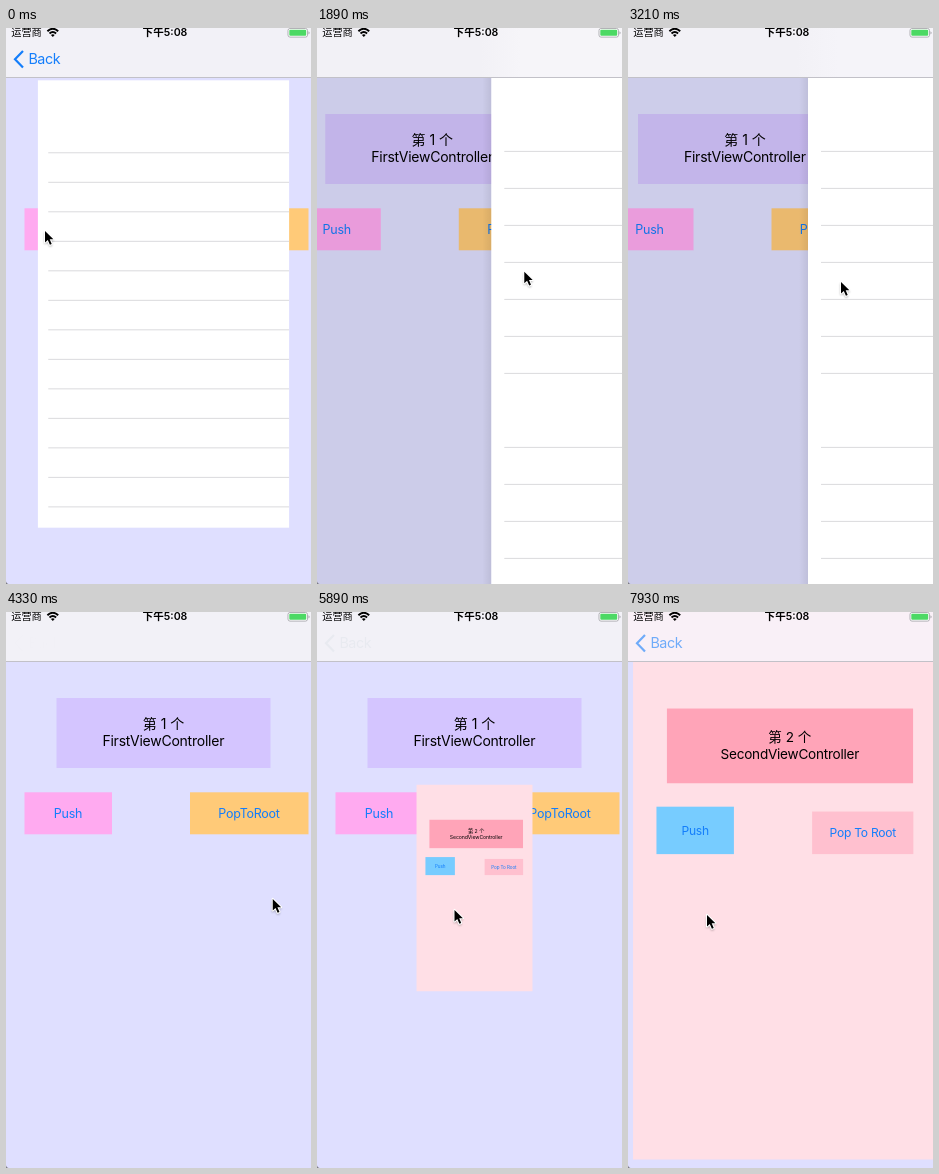
An HTML page for the animation above (7990 ms loop, 305 px wide and 556 px high).

```html
<!DOCTYPE html>
<html lang="zh-Hans">
<head>
<meta charset="utf-8">
<title>Navigation transitions</title>
<style>
html, body { margin: 0; width: 100%; height: 100%; overflow: hidden; background: #dfdfff; }
svg { display: block; width: 100vw; height: 100vh; }
text { font-family: Inter, "Noto Sans CJK SC", "Noto Sans CJK", sans-serif; text-anchor: middle; }
.title { font-size: 14px; letter-spacing: -.24px; }
.cjk { font-size: 14px; }
.button { font-size: 12.5px; letter-spacing: -.26px; fill: #147efb; }
.back { font-size: 14.3px; letter-spacing: -.4px; text-anchor: start; }
.rule { stroke: #dadadd; stroke-width: 1; vector-effect: non-scaling-stroke; }
</style>
</head>
<body>
<svg viewBox="0 0 305 556" preserveAspectRatio="none">
  <defs>
    <linearGradient id="edge"><stop offset="0" stop-opacity="0"/><stop offset="1" stop-opacity=".16"/></linearGradient>
    <linearGradient id="fade"><stop offset=".8" stop-color="#f2f1f6"/><stop offset="1" stop-color="#f2f1f6" stop-opacity="0"/></linearGradient>
    <filter id="soft" x="-50%" y="-50%" width="200%" height="200%"><feGaussianBlur stdDeviation="1"/></filter>
    <path id="arrow" d="M1 1.5V13L3.8 10.4 5.9 15.2 7.7 14.4 5.7 9.7H9.4Z"/>
  </defs>

  <rect width="305" height="556" fill="#dfdfff"/>
  <g id="first">
    <rect x="50.5" y="86" width="214" height="70" fill="#d4c5ff"/>
    <text class="cjk" x="157.5" y="117.2">第 1 个</text>
    <text class="title" x="157.3" y="134">FirstViewController</text>
    <rect x="18.5" y="180.3" width="87.5" height="42" fill="#ffaaf0"/>
    <text class="button" x="62" y="206">Push</text>
    <rect x="184" y="180.3" width="118.5" height="42" fill="#ffca78"/>
    <text class="button" x="243" y="206">PopToRoot</text>
  </g>
  <rect id="dim" width="305" height="556"/>

  <g id="second">
    <rect y="-4.5" width="315" height="561" fill="#ffdfe6"/>
    <rect x="35" y="90.6" width="254.3" height="77.2" fill="#ffa4b8"/>
    <text class="cjk" x="162" y="125.5">第 2 个</text>
    <text class="title" x="162" y="142.5">SecondViewController</text>
    <rect x="24.2" y="192" width="80" height="49" fill="#77ccff"/>
    <text class="button" x="64.2" y="221">Push</text>
    <rect x="185" y="197" width="104.6" height="44" fill="#ffc0cf"/>
    <text class="button" x="237.3" y="223.3">Pop To Root</text>
  </g>

  <g id="table">
    <rect x="-9" y="-4.5" width="9" height="561" fill="url(#edge)" id="shadow"/>
    <rect y="-4.5" width="315" height="561" fill="#fff"/>
    <g id="rules"></g>
  </g>

  <rect id="bar" width="305" height="49"/>
  <rect id="patch" height="49" fill="url(#fade)"/>
  <rect y="49" width="305" height="1" fill="#c2c1c8"/>
  <g id="back">
    <path d="M17 23L9 31.3 17 39.6" fill="none" stroke="currentColor" stroke-width="2.2"/>
    <text class="back" x="22.4" y="36.3" fill="currentColor">Back</text>
  </g>

  <text x="20.5" y="8" font-size="10.2">运营商</text>
  <g fill="none" stroke="#000" stroke-width="2">
    <path d="M41.4 3.2Q46.8 -1.6 52.2 3.2M43.5 5.4Q46.8 2.6 50.1 5.4"/>
    <path d="M46.8 9L44.9 7Q46.8 5.5 48.7 7Z" fill="#000" stroke="none"/>
  </g>
  <text x="159" y="8.3" font-size="10.6" font-weight="600">下午5:08</text>
  <rect x="282" y=".5" width="19.5" height="8.6" rx="2" fill="#fff" stroke="#a0a0a5" stroke-width=".8"/>
  <rect x="283.3" y="1.8" width="16.9" height="6" rx="1" fill="#4cd964"/>
  <path d="M302.5 3.2Q304.6 4.8 302.5 6.4Z" fill="#a0a0a5"/>
  <path d="M0 553.5Q.4 555.6 2.5 556H0Z" fill="#77777c"/>

  <g id="cursor">
    <use href="#arrow" y="1.5" stroke="#000" opacity=".35" filter="url(#soft)"/>
    <use href="#arrow" stroke="#fff" stroke-width="2.2" stroke-linejoin="round"/>
    <use href="#arrow"/>
  </g>
</svg>
<script>
const LOOP = 7990, WIDTH = 315, CENTER = [157.5, 276], SMALL = .7975;
const WHITE = [254, 254, 254], LILAC = [242, 241, 247], PINK = [249, 240, 247];

const $ = id => document.getElementById(id);
const set = (id, attrs) => { for (const k in attrs) $(id).setAttribute(k, attrs[k]); };
const clamp = v => Math.min(1, Math.max(0, v));
const smooth = p => p * p * (3 - 2 * p);
const ramp = (t, from, to) => clamp((t - from) / (to - from));
const arch = (t, from, to) => Math.sin(Math.PI * ramp(t, from, to));
const mix = (a, b, p) => `rgb(${a.map((v, i) => Math.round(v + (b[i] - v) * p))})`;
const zoom = s => `translate(${CENTER}) scale(${s}) translate(${CENTER.map(v => -v)})`;

for (let i = 0; i < 13; i++) {
  const gap = i % 8 === 0 ? ' data-gap' : '';
  $('rules').innerHTML += `<path class="rule" d="M13 ${86.4 + 37 * i}H315"${gap}/>`;
}
const gapRules = document.querySelectorAll('[data-gap]');

// Each term is one hand movement, in order of time.
const cursorX = t => 38
  - 11 * ramp(t, 630, 990) - 26 * arch(t, 630, 990)
  + 39 * ramp(t, 1380, 2160) + 174 * arch(t, 1380, 2160)
  - 14 * ramp(t, 2220, 2330)
  + 160 * ramp(t, 2430, 3180) ** 1.25
  + 54 * ramp(t, 3770, 4150)
  - 194 * ramp(t, 4330, 5100)
  + 64.5 * ramp(t, 5160, 5890)
  - 94.5 * ramp(t, 6000, 6670)
  + 8 * ramp(t, 6780, 6870)
  - 5 * ramp(t, 6930, 7540) - 22 * arch(t, 6930, 7540)
  + 33 * ramp(t, 7650, 7930);

const cursorY = t => 201.5
  + 31 * ramp(t, 630, 990)
  + 24 * ramp(t, 1380, 2630)
  - 4 * ramp(t, 2630, 3210)
  + 33 * ramp(t, 3770, 4150)
  + 11 * ramp(t, 4330, 5890)
  + 8 * ramp(t, 6000, 6670)
  - 3 * ramp(t, 6930, 7540);

function drawTable(t, x) {
  const shown = t < 3530;
  const scale = SMALL + (1 - SMALL) * ramp(t, 30, 180);
  const full = scale === 1;
  const dragged = t < 1380 ? 0 : Math.max(0, x - 32);
  const offset = dragged + (WIDTH - dragged) * ramp(t, 3365, 3530);
  const popped = offset / WIDTH;
  const sliding = shown && full;

  set('table', { display: shown ? 'inline' : 'none', transform: `translate(${offset} 0) ${zoom(scale)}` });
  set('shadow', { opacity: offset > 0 ? 1 - popped : 0 });
  gapRules.forEach(r => r.setAttribute('display', full ? 'none' : 'inline'));
  set('first', { transform: `translate(${sliding ? -.3 * WIDTH * (1 - popped) : 0} 0)` });
  set('dim', { opacity: sliding ? .19 * (1 - popped) : 0 });
  set('patch', { width: sliding && offset > 0 ? offset + 30 : 0 });
  if (!shown) return;
  set('bar', { fill: full ? mix(WHITE, LILAC, clamp(popped * 2 - .4)) : mix(LILAC, WHITE, ramp(t, 30, 180)) });
  set('back', { color: '#147efb', opacity: clamp(1 - popped * 3) });
}

function drawSecond(t, x) {
  const pop = ramp(t, 7650, 7930);
  const pushing = t < 6750;
  const scale = t < 4330 ? 0
    : t < 6700 ? smooth(clamp((266 - x) / WIDTH))
    : SMALL + (1 - SMALL) * ramp(t, 6750, 6905) - .032 * pop;

  set('second', { display: scale > .002 ? 'inline' : 'none', transform: zoom(scale) });
  if (t < 3530) return;
  set('bar', { fill: mix(LILAC, PINK, ramp(t, 6750, 6870)) });
  set('back', {
    color: pushing ? '#e8eaf0' : '#147efb',
    opacity: pushing ? ramp(t, 4330, 4530) : ramp(t, 6760, 7000) - .4 * pop
  });
}

function draw(t) {
  const x = cursorX(t);
  set('cursor', { transform: `translate(${x} ${cursorY(t)})` });
  drawTable(t, x);
  drawSecond(t, x);
}

const start = performance.now();
function tick() {
  draw((performance.now() - start) % LOOP);
  requestAnimationFrame(tick);
}
draw(0);
requestAnimationFrame(tick);
</script>
</body>
</html>
```
